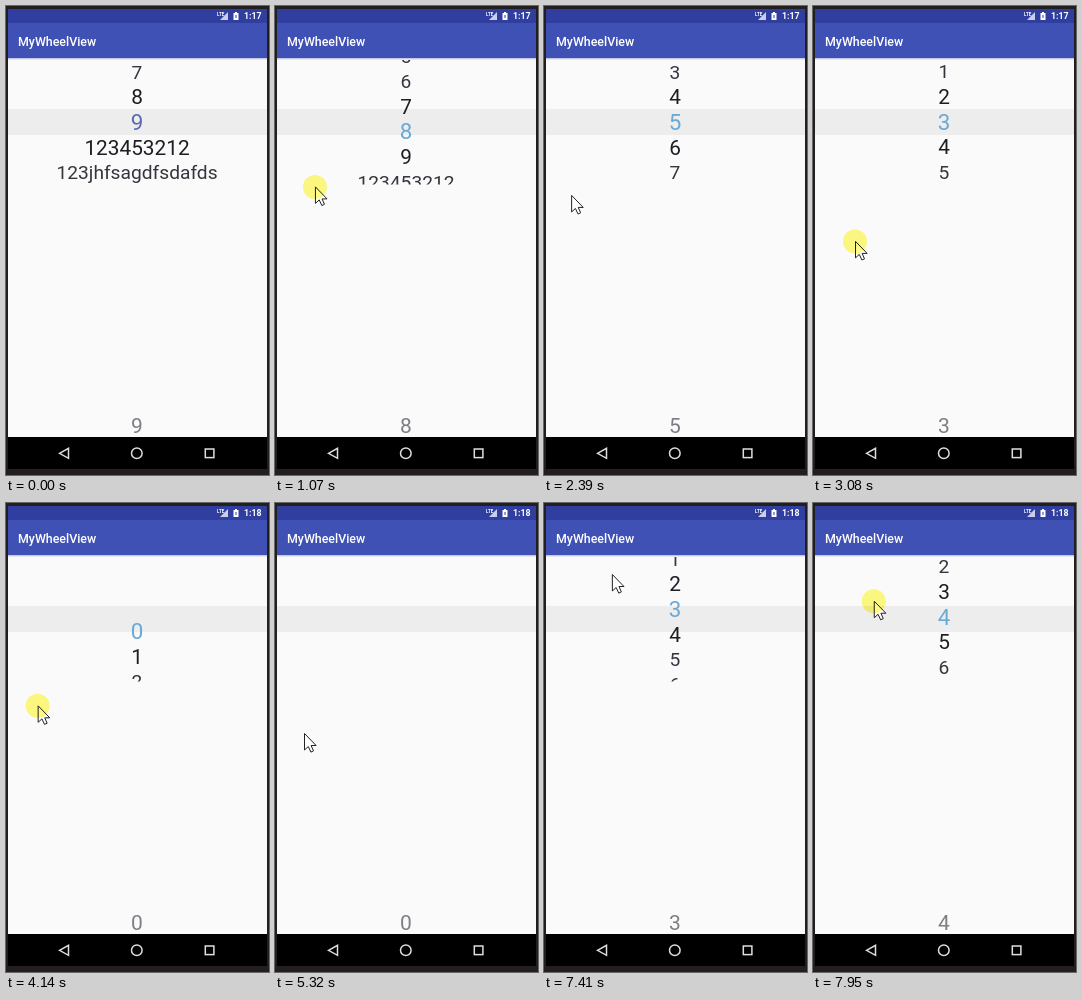
An HTML page with a canvas for the animation above (8 s loop, 263x469 px).

```html
<!DOCTYPE html>
<html lang="en">
<head>
<meta charset="utf-8">
<title>Wheel view</title>
<style>
  html, body { margin: 0; width: 100%; height: 100%; overflow: hidden; background: #231f20; }
  canvas { display: block; width: 263px; height: 469px; }
</style>
</head>
<body>
<canvas id="stage"></canvas>
<script>
const W = 263, H = 469, LOOP = 8000;
const PITCH = 25.15, CENTER_X = 131, CENTER_Y = 116.2;
const ITEMS = [..."0123456789", "123453212", "123jhfsagdfsdafds"];
const FIRST_INDEX = 9, ENTER_TIME = 70, ENTER_POINT = [158, 333];
const GLIDE_TIME = 600, SETTLE_TIME = 250;

// Each drag moves the wheel one to one; on release it settles on a row
const DRAGS = [
  { press: 760, release: 1800, from: [54, 147], to: [16, 240], power: 1.3, settle: 5 },
  { press: 2490, release: 3230, from: [28, 186], to: [44, 243], power: 1.3, settle: 3 },
  { press: 3630, release: 5300, from: [40, 116], to: [29, 231], power: 3.9, settle: 0 },
  { press: 6250, release: 6880, from: [71, 148], to: [71, 140], power: 4, settle: 8 / PITCH },
  { press: 6880, release: 7320, from: [71, 140], to: [69, 69], power: 1.3, settle: 4 },
  { press: 7800, release: LOOP, from: [57, 101], to: [62, 98], power: 1, settle: 4 }
];

const canvas = document.getElementById("stage");
const ctx = canvas.getContext("2d");
const scale = window.devicePixelRatio || 1;
canvas.width = W * scale;
canvas.height = H * scale;

const clamp = (v, low, high) => Math.max(low, Math.min(high, v));
const mix = (a, b, k) => a + (b - a) * k;
const mixPoint = (a, b, k) => a.map((v, i) => mix(v, b[i], k));
const progress = (t, from, to) => clamp((t - from) / (to - from), 0, 1);
const smooth = k => k * k * (3 - 2 * k);

// Pointer place, button state and wheel position at time t
function stateAt(t) {
  let index = FIRST_INDEX, rest = ENTER_POINT, restTime = ENTER_TIME;
  let position = index;
  for (const { press, release, from, to, power, settle } of DRAGS) {
    if (t < press) {
      const glideStart = Math.max(restTime, press - GLIDE_TIME);
      const k = smooth(progress(t, glideStart, press));
      return { point: mixPoint(rest, from, k), pressed: false, position };
    }
    if (t < release) {
      const k = 1 - (1 - progress(t, press, release)) ** power;
      const point = mixPoint(from, to, k);
      return { point, pressed: true, position: index - (point[1] - from[1]) / PITCH };
    }
    const dropped = index - (to[1] - from[1]) / PITCH;
    position = mix(dropped, settle, smooth(progress(t, release, release + SETTLE_TIME)));
    index = settle;
    rest = to;
    restTime = release;
  }
  return { point: rest, pressed: false, position };
}

function rect(x, y, w, h, color) {
  ctx.fillStyle = color;
  ctx.fillRect(x, y, w, h);
}

function text(str, x, y, size, color, align = "left", weight = 400) {
  ctx.font = `${weight} ${size}px Roboto, sans-serif`;
  ctx.textAlign = align;
  ctx.fillStyle = color;
  ctx.fillText(str, x, y);
}

function path(points) {
  ctx.beginPath();
  points.forEach(([x, y]) => ctx.lineTo(x, y));
  ctx.closePath();
}

function disc(x, y, r) {
  ctx.beginPath();
  ctx.arc(x, y, r, 0, Math.PI * 2);
}

function drawBars(t) {
  rect(2, 3, 259, 14, "#303f9f");
  rect(2, 17, 259, 35, "#3f51b5");
  rect(2, 52, 259, 1, "#c3c8e6");
  rect(2, 53, 259, 1, "#e6e7f1");
  text("MyWheelView", 12, 40, 12.4, "#fff", "left", 500);
  text("LTE", 211, 9.5, 4.5, "#fff", "left", 700);
  path([[222, 6], [222, 14], [214, 14]]);
  ctx.fillStyle = "#c9cee9";
  ctx.fill();
  rect(227.5, 7, 5, 7, "#fff");
  rect(229, 6, 2, 1, "#fff");
  rect(229.5, 9, 1, 3, "#303f9f");
  text(t < 3700 ? "1:17" : "1:18", 238, 13.3, 8.8, "#fff", "left", 700);
}

function drawNav() {
  rect(2, 431, 259, 32, "#000");
  ctx.strokeStyle = "#dedede";
  ctx.lineWidth = 1.5;
  path([[53.5, 447.3], [62.5, 442.3], [62.5, 452.3]]);
  ctx.stroke();
  disc(130.8, 447.3, 5.3);
  ctx.stroke();
  ctx.strokeRect(199.3, 443, 8.6, 8.6);
}

function drawWheel(position) {
  const current = clamp(Math.round(position), 0, ITEMS.length - 1);
  rect(2, 103, 259, 26, "#ededed");
  ctx.save();
  ctx.beginPath();
  ctx.rect(2, 53, 259, 125.5);
  ctx.clip();
  // The wheel goes blank when pulled too far past its start
  if (position > -1.5) {
    ITEMS.forEach((item, i) => {
      const y = CENTER_Y + (i - position) * PITCH;
      const distance = Math.min(2, Math.abs(i - current));
      const size = 22.4 - 1.6 * distance;
      const picked = i >= 9 ? "#5a6bb4" : "#6aa9d6";
      const color = [picked, "#1c1e23", "#34363d"][distance];
      text(item, CENTER_X, y + size * 0.355, size, color, "center");
    });
  }
  ctx.restore();
  text(ITEMS[current], CENTER_X, 427, 21, "#7e7e84", "center");
}

function drawPointer([x, y], pressed) {
  const arrow = [[0, 0], [0, 16.5], [3.8, 13], [6.4, 18.6], [9, 17.4], [6.6, 12], [11.6, 12]];
  path(arrow.map(([dx, dy]) => [x + 0.5 + dx, y - 0.5 + dy]));
  ctx.fillStyle = "#fff";
  ctx.fill();
  ctx.strokeStyle = "#222";
  ctx.lineWidth = 1;
  ctx.stroke();
  if (!pressed) return;
  // The click highlight tints the arrow as well
  ctx.globalCompositeOperation = "multiply";
  disc(x, y - 0.5, 12);
  ctx.fillStyle = "#fffb82";
  ctx.fill();
  ctx.globalCompositeOperation = "source-over";
}

function draw(t) {
  const { point, pressed, position } = stateAt(t);
  ctx.setTransform(scale, 0, 0, scale, 0, 0);
  rect(0, 0, W, H, "#231f20");
  rect(2, 53, 259, 378, "#fafafa");
  drawWheel(position);
  drawBars(t);
  drawNav();
  if (t >= ENTER_TIME) drawPointer(point, pressed);
}

const start = performance.now();
function tick() {
  draw((performance.now() - start) % LOOP);
  requestAnimationFrame(tick);
}
tick();
</script>
</body>
</html>
```
